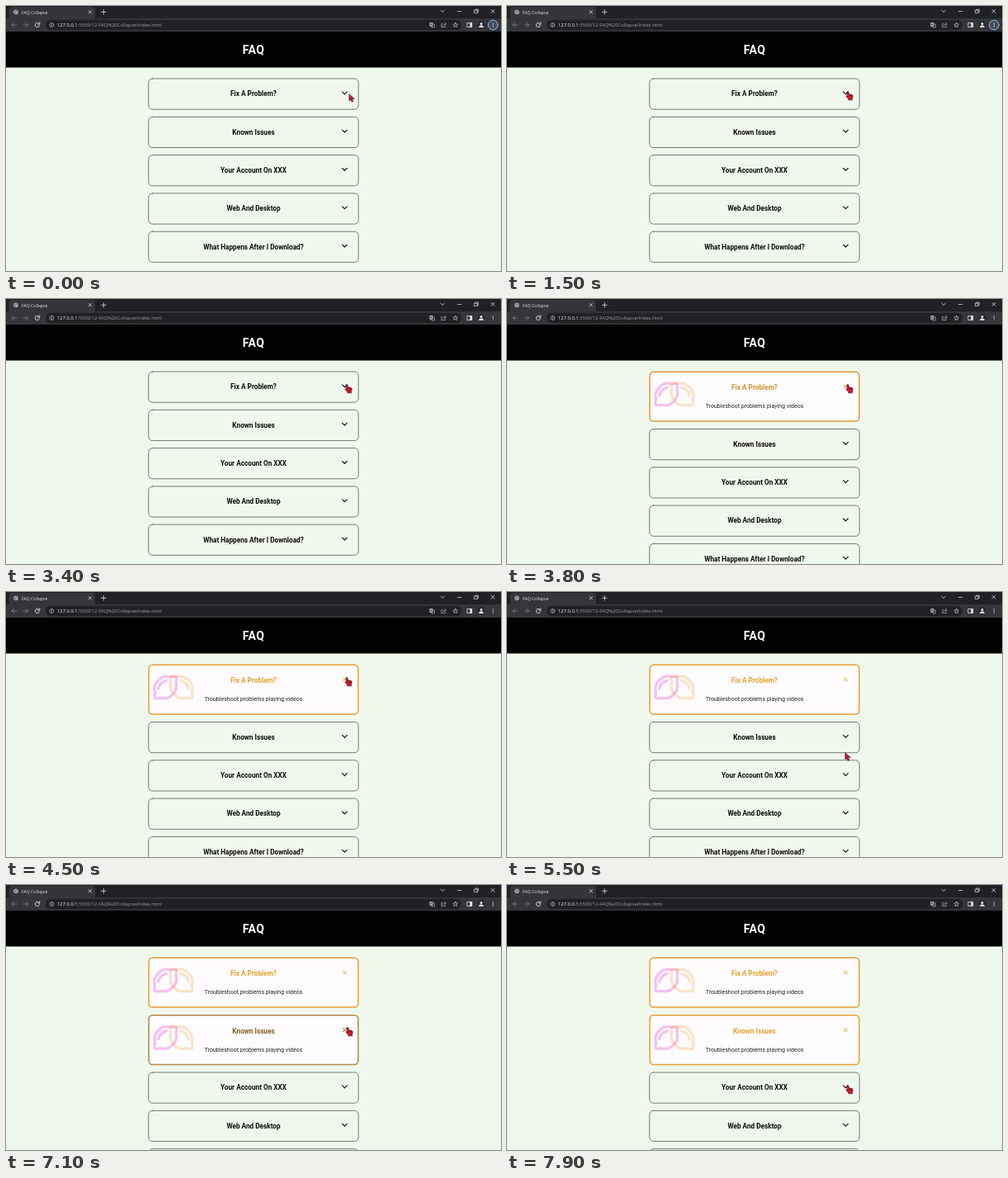
Recreate the animation shown at these times as an HTML page with a canvas. Size 600x321 px, loop 8000 ms.

```html
<!DOCTYPE html>
<html lang="en">
<head>
<meta charset="utf-8">
<title>FAQ Collapse</title>
<style>
html, body { margin: 0; width: 100%; height: 100%; overflow: hidden; background: #f0f8ed; }
canvas { display: block; width: 600px; height: 321px; }
</style>
</head>
<body>
<canvas id="stage"></canvas>
<script>
const W = 600, H = 321, LOOP = 8000;
const canvas = document.getElementById('stage');
const ctx = canvas.getContext('2d');
const dpr = window.devicePixelRatio || 1;
canvas.width = W * dpr;
canvas.height = H * dpr;

const PAGE = 'Roboto, sans-serif', UI = '"Open Sans", sans-serif';
const INK = [10, 10, 10], LINE = [104, 108, 104], ORANGE = [232, 160, 48];
const LIGHT = '#dfe1e5', DIM = '#7d8084';

const cards = [
  { title: 'Fix A Problem?', openAt: 3600 },
  { title: 'Known Issues', openAt: 7000 },
  { title: 'Your Account On XXX' },
  { title: 'Web And Desktop' },
  { title: 'What Happens After I Download?' }
];
const ANSWER = 'Troubleshoot problems playing videos';

// time, x, y of the pointer tip
const track = [
  [0, 416, 107], [300, 416, 107], [800, 413, 103.5], [4600, 413, 103.5],
  [5350, 410, 195], [5750, 410, 195], [6350, 414, 172.5],
  [7250, 414, 172.5], [7700, 413, 242.5], [LOOP, 413, 242.5]
];

const lemon = new Path2D('M26 1.6C23.5 1.8 22.5 2.7 19.6 2C14.2 .6 10 2.6 6.3 6.3S.6 14.2 2 19.6' +
  'C2.7 22.5 1.6 23.5 1.6 26C1.6 27.5 2.6 28.4 4 28.4C6.5 28.4 7.5 27.3 10.4 28' +
  'C15.8 29.4 20 27.4 23.7 23.7S29.4 15.8 28 10.4C27.3 7.5 28.4 6.5 28.4 4C28.4 2.6 27.4 1.6 26 1.6Z' +
  'M6.3 16.5Q8 9 16 6.8');
const arrow = new Path2D('M0 0V8L1.9 6.4L3.3 9.3L4.8 8.6L3.4 5.8L6 5.5Z');
const hand = new Path2D('M-1 .6Q0-.6 1 .6L1.6 3.4L5 4Q6.4 4.4 6.3 6L5.6 8.2V10.3H.8V9L-1.9 5.9Q-1.7 4.6-.2 5.4Z');

const smooth = k => k * k * (3 - 2 * k);
const mix = (a, b, k) => `rgb(${a.map((v, i) => Math.round(v + (b[i] - v) * k))})`;

function text(str, x, y, font, color, align = 'left') {
  ctx.font = font;
  ctx.fillStyle = color;
  ctx.textAlign = align;
  ctx.fillText(str, x, y);
}

function box(x, y, w, h, r, fill) {
  ctx.beginPath();
  ctx.roundRect(x, y, w, h, r);
  ctx.fillStyle = fill;
  ctx.fill();
}

function stroke(path, color, width = 0.8) {
  ctx.strokeStyle = color;
  ctx.lineWidth = width;
  ctx.stroke(new Path2D(path));
}

function ring(x, y, r, color, width = 0.8, from = 0, to = Math.PI * 2) {
  ctx.beginPath();
  ctx.arc(x, y, r, from, to);
  ctx.strokeStyle = color;
  ctx.lineWidth = width;
  ctx.stroke();
}

function dot(x, y, r, color) {
  ctx.beginPath();
  ctx.arc(x, y, r, 0, Math.PI * 2);
  ctx.fillStyle = color;
  ctx.fill();
}

const cross = (x, y, s) => `M${x - s} ${y - s}L${x + s} ${y + s}M${x + s} ${y - s}L${x - s} ${y + s}`;

function drawTabs() {
  box(0, 0, W, 16, 0, '#202124');
  box(3.5, 1, 104.5, 16, [3.5, 3.5, 0, 0], '#35363a');
  dot(12, 7.3, 2.9, '#a4a8ad');
  stroke('M9.8 6.2L11.6 7.2L11 9.3M12.2 4.8L13 6.4L14.6 7.2', '#54575b', 0.7);
  text('FAQ Collapse', 19, 9.5, `5.15px ${UI}`, LIGHT);
  stroke(cross(101.8, 7.3, 1.7), LIGHT);
  stroke('M115.5 7.3H121.1M118.3 4.5V10.1', LIGHT);
  stroke('M527 5.3L529.2 7.4L531.4 5.3', LIGHT);
  stroke('M547.3 6.5H552', LIGHT, 0.7);
  stroke('M567.8 5.2H571.2V8.6H567.8ZM569 5V4H572.4V7.4H571.4', LIGHT, 0.7);
  stroke(cross(590, 6.3, 2), LIGHT);
}

function drawToolbar(t) {
  box(0, 15, W, 16, 0, '#35363a');
  stroke('M12.6 23H7M9.6 20.4L7 23L9.6 25.6', DIM);
  stroke('M21 23H26.6M24 20.4L26.6 23L24 25.6', DIM);
  ring(38, 23, 2.6, LIGHT, 0.9, 0.3, 5.5);
  stroke('M38.5 22.2H40.8V19.9', LIGHT, 0.9);

  box(48, 16.8, 504, 12.4, 6.2, '#202124');
  ring(55.4, 23, 2.5, '#b8bbc0', 0.7);
  stroke('M55.4 22.6V24.5M55.4 21.3V21.9', '#b8bbc0', 0.7);
  const font = `5.83px ${UI}`, host = '127.0.0.1';
  text(host, 62, 25, font, '#f1f3f4');
  text(':5500/12-FAQ%20Collapse/index.html', 62 + ctx.measureText(host).width, 25, font, '#9aa0a6');

  box(513.4, 20, 4, 4.8, 0.5, '#aeb1b6');
  stroke('M517.4 22H519.4V26H516L515.2 24.8', '#aeb1b6', 0.7);
  stroke('M514.4 22.2H516.4M515.4 21.2V23.6', '#303236', 0.5);
  stroke('M529 21.4H527.8V25.6H532.4V24.4M529.2 24Q529.5 21.8 533 21.8M531.6 20.2L533.3 21.8L531.6 23.4', '#aeb1b6', 0.7);
  ctx.beginPath();
  for (let i = 0; i < 10; i++) {
    const a = i * Math.PI / 5 - Math.PI / 2, r = i % 2 ? 1.35 : 3;
    ctx.lineTo(544.7 + Math.cos(a) * r, 23.1 + Math.sin(a) * r);
  }
  ctx.closePath();
  ctx.strokeStyle = '#c8cbd0';
  ctx.lineWidth = 0.7;
  ctx.stroke();

  stroke('M559.3 20.5H564.7V25.5H559.3Z', LIGHT);
  box(562.3, 20.3, 2.7, 5.4, 0, LIGHT);
  dot(576, 23, 4.4, '#24272b');
  dot(576, 21.5, 1.5, LIGHT);
  box(573.2, 23.5, 5.6, 2.4, [1.8, 1.8, 0, 0], LIGHT);
  if (t < 2900) {
    dot(590.4, 23, 6, '#434b59');
    ring(590.4, 23, 5.8, '#a9c4ee', 0.9);
  }
  for (const y of [20.9, 23, 25.1]) dot(590.4, y, 0.65, LIGHT);
}

function drawHeader() {
  box(0, 31, W, 43.5, 0, '#000');
  ctx.letterSpacing = '0.44px';
  text('FAQ', 300, 57.8, `700 14.05px ${PAGE}`, '#fff', 'center');
  ctx.letterSpacing = '0px';
}

function drawLemon(x, y, color, flip) {
  ctx.save();
  ctx.translate(x, y);
  if (flip) ctx.scale(-1, 1);
  ctx.strokeStyle = color;
  ctx.lineWidth = 3.3;
  ctx.stroke(lemon);
  ctx.restore();
}

// Returns the centres of the card buttons.
function drawCards(t) {
  let top = 88;
  return cards.map(({ title, openAt }) => {
    const open = t >= openAt;
    const k = open ? 1 - (1 - Math.min(1, (t - openAt) / 300)) ** 2 : 0;
    const h = open ? 60.4 : 37.2;
    const mid = top + (open ? 19.4 : 18.5);
    const btn = mid - 1.2;
    const ink = mix(INK, ORANGE, k);
    const inset = open ? 0.3 : 0;

    box(172.8, top, 254.4, h, 4.6, open ? '#fefcfe' : '#f0f8ed');
    if (open) {
      drawLemon(178.3, top + 12.5, 'rgba(232, 100, 220, .4)');
      drawLemon(227.5, top + 12.5, 'rgba(240, 170, 70, .3)', true);
      text(ANSWER, 300, top + 44.2, `7.03px ${PAGE}`, '#222', 'center');
    }
    ctx.beginPath();
    ctx.roundRect(172.8 + inset, top + inset, 254.4 - 2 * inset, h - 2 * inset, 4.6);
    ctx.strokeStyle = mix(LINE, ORANGE, k);
    ctx.lineWidth = open ? 1.5 : 0.9;
    ctx.stroke();

    text(title, 300, mid + 2.8, `700 8.22px ${PAGE}`, ink, 'center');
    if (open) stroke(cross(410.5, btn - 0.2, 2), ink, 1);
    else stroke(`M407.6 ${btn - 1.4}L410.5 ${btn + 1.5}L413.4 ${btn - 1.4}`, ink, 1.1);

    top += h + 9.1;
    return btn;
  });
}

function pointerAt(t) {
  const i = Math.max(1, track.findIndex(p => p[0] > t));
  const [t0, x0, y0] = track[i - 1], [t1, x1, y1] = track[i];
  const k = smooth((t - t0) / (t1 - t0));
  return [x0 + (x1 - x0) * k, y0 + (y1 - y0) * k];
}

function drawPointer(t, buttons) {
  const [x, y] = pointerAt(t);
  const over = buttons.some(b => Math.abs(x - 410.5) < 5 && Math.abs(y - b) < 5);
  const shape = over ? hand : arrow;
  ctx.save();
  ctx.translate(x, y);
  ctx.fillStyle = over ? '#d3172c' : '#bd1c3c';
  ctx.fill(shape);
  ctx.strokeStyle = '#4a101c';
  ctx.lineWidth = 0.7;
  ctx.stroke(shape);
  if (over) {
    ctx.beginPath();
    ctx.moveTo(2.6, 3.8);
    ctx.lineTo(2.7, 5.6);
    ctx.moveTo(4.3, 4.1);
    ctx.lineTo(4.3, 5.8);
    ctx.lineWidth = 0.5;
    ctx.stroke();
  }
  ctx.restore();
}

function draw(t) {
  ctx.setTransform(dpr, 0, 0, dpr, 0, 0);
  ctx.lineCap = ctx.lineJoin = 'round';
  box(0, 0, W, H, 0, '#f0f8ed');
  drawTabs();
  drawToolbar(t);
  drawHeader();
  drawPointer(t, drawCards(t));
}

const start = performance.now();
function tick(now) {
  draw(Math.max(0, now - start) % LOOP);
  requestAnimationFrame(tick);
}
draw(0);
requestAnimationFrame(tick);
</script>
</body>
</html>
```
